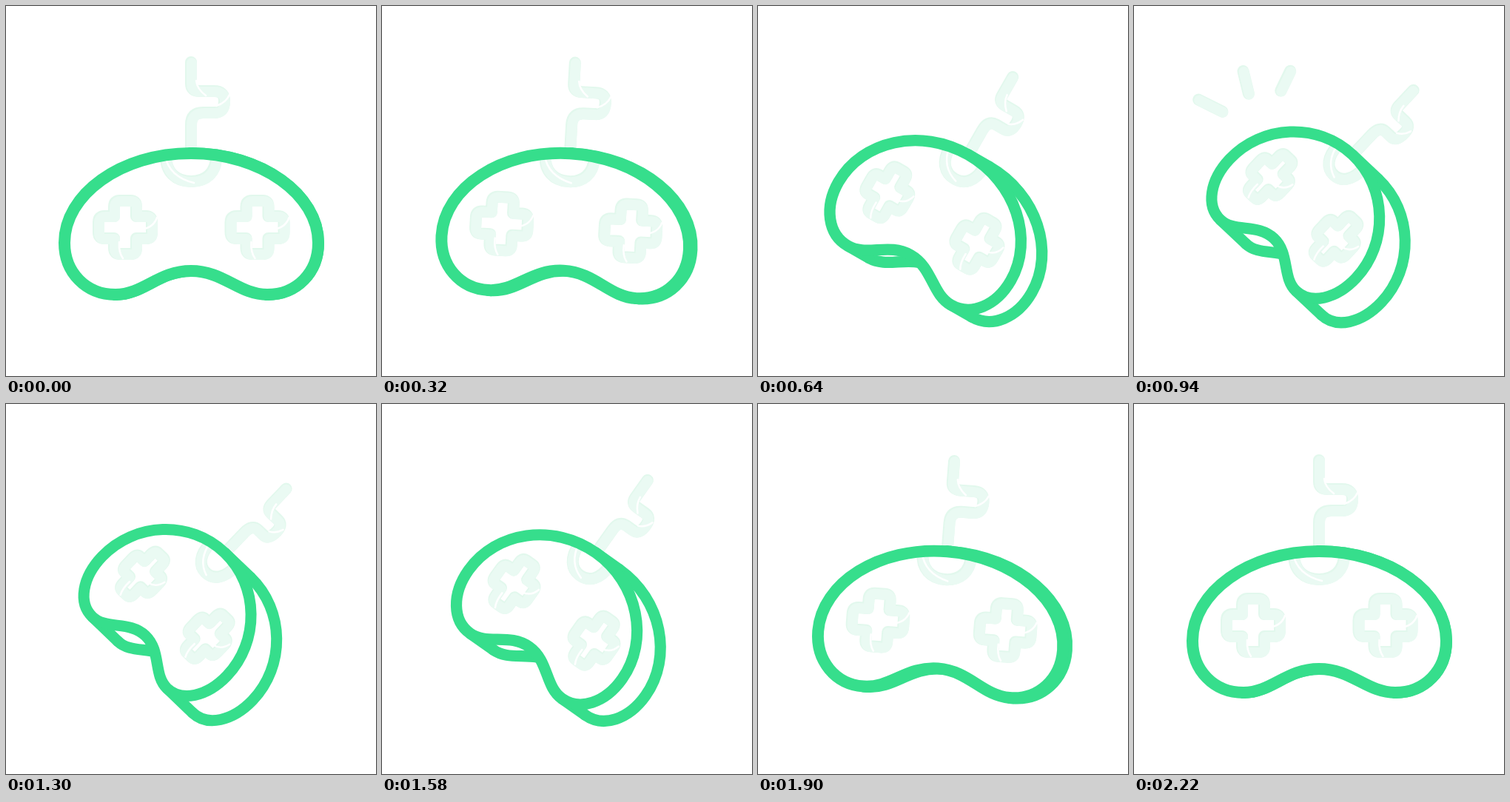
Recreate the animation shown at these times as an HTML page. Size 500x500 px, loop 2.4 s.

```html
<!DOCTYPE html>
<html lang="en">
<head>
<meta charset="utf-8">
<title>Game controller</title>
<style>
  html, body { margin: 0; width: 100%; height: 100%; overflow: hidden; background: #fff; }
  svg { display: block; width: 500px; height: 500px; }
  svg * { vector-effect: non-scaling-stroke; }
  .line { fill: none; stroke: #36de8c; stroke-linecap: round; stroke-linejoin: round; }
  .rim, .soft, .gap { fill: none; stroke-linecap: round; stroke-linejoin: round; }
  .rim { stroke: #e2f8ed; stroke-width: 16; }
  .soft { stroke: #eafaf3; stroke-width: 14; }
  .gap { stroke: #fff; stroke-width: 2.5; }
</style>
</head>
<body>
<svg viewBox="0 0 500 500">
  <defs>
    <path id="plus" d="M-15-28q0-8 8-8h14q8 0 8 8v13h13q8 0 8 8v14q0 8-8 8h-13v13q0 8-8 8h-14q-8 0-8-8v-13h-13q-8 0-8-8v-14q0-8 8-8h13z"/>
    <path id="cable" d="M250 76V105Q250 115 262 115H281Q295 115 295 128Q295 144 281 144H266Q250 144 250 160V197"/>
    <path id="hook" d="M216 203C216 225 230 237 250 237C270 237 284 225 284 203"/>
    <path id="face" d="M250 199C155 199 79 255 79 320C79 360 108 390 148 390C186 390 206 358 250 358C294 358 315 390 353 390C393 390 422 360 422 320C422 255 345 199 250 199Z"/>
    <g id="pad">
      <use href="#plus" class="rim"/>
      <use href="#plus" class="soft" x="1" y="1"/>
      <path class="gap" d="M21 3Q38 1 43-13M-8 20Q-9 34-3 42"/>
    </g>
  </defs>

  <g id="rays"></g>
  <g id="body">
    <use href="#cable" class="rim"/>
    <use href="#cable" class="soft" x="1" y="1"/>
    <path class="gap" d="M257 101Q258 112 270 121M284 135Q297 131 302 120"/>
    <g id="back" class="line">
      <path d="M148 390C186 390 206 358 250 358"/>
      <path d="M353 390C393 390 422 360 422 320C422 255 345 199 250 199"/>
    </g>
    <path id="edges" class="line"/>
    <use href="#face" fill="#fff"/>
    <use href="#hook" class="rim"/>
    <use href="#hook" class="soft" x="1" y="1"/>
    <path class="gap" d="M215 203Q221 231 254 239"/>
    <use href="#pad" x="161" y="299"/>
    <use href="#pad" x="339.5" y="299"/>
    <use href="#face" class="line"/>
  </g>
</svg>
<script>
const LOOP = 2400, STEP = 20;
const $ = id => document.getElementById(id);
const body = $('body'), back = $('back'), edges = $('edges');

// inner end, then outer end
const rays = [[120, 143, 85, 125.5], [155, 119, 147, 86], [198, 115, 212, 86]].map(ends => {
  const lines = ['rim', 'soft'].map(name => {
    const el = document.createElementNS('http://www.w3.org/2000/svg', 'path');
    el.setAttribute('class', name);
    $('rays').append(el);
    return el;
  });
  return { ends, lines };
});

const span = (t, a, b) => Math.min(1, Math.max(0, (t - a) / (b - a)));
const easeInOut = p => p < 0.5 ? 4 * p ** 3 : 1 - 4 * (1 - p) ** 3;
const easeOut = p => 1 - (1 - p) ** 2;
const easeIn = p => p * p;

function drawBody(t) {
  const turn = easeInOut(span(t, 45, 1090)) - easeInOut(span(t, 1240, 2175));
  const squeeze = 1 - 0.32 * turn;
  const depth = 48 * turn / squeeze;
  const x = 250 - 21.8 * turn, y = 299 - 27.5 * turn * turn;
  body.setAttribute('transform',
    `translate(${x} ${y}) rotate(${43.8 * turn}) scale(${squeeze} ${1 - 0.025 * turn}) translate(-250 -299)`);
  body.setAttribute('stroke-width', 16 - turn);
  back.setAttribute('transform', `translate(${depth} 0)`);
  edges.setAttribute('d', `M250 199h${depth}M148 390h${depth}M353 390h${depth}`);
}

function drawRays(t) {
  const head = easeOut(span(t, 760, 1000)), tail = easeIn(span(t, 920, 1070));
  const shown = head > 0 && tail < 1;
  for (const { ends: [x0, y0, x1, y1], lines } of rays) {
    const at = (p, o) => `${x0 + (x1 - x0) * p + o} ${y0 + (y1 - y0) * p + o}`;
    lines.forEach((el, i) => {
      el.setAttribute('d', shown ? `M${at(Math.min(tail, head), i)}L${at(head, i)}` : '');
    });
  }
}

const start = performance.now();
function frame() {
  const t = Math.floor((performance.now() - start) % LOOP / STEP) * STEP;
  drawBody(t);
  drawRays(t);
  requestAnimationFrame(frame);
}
frame();
</script>
</body>
</html>
```
